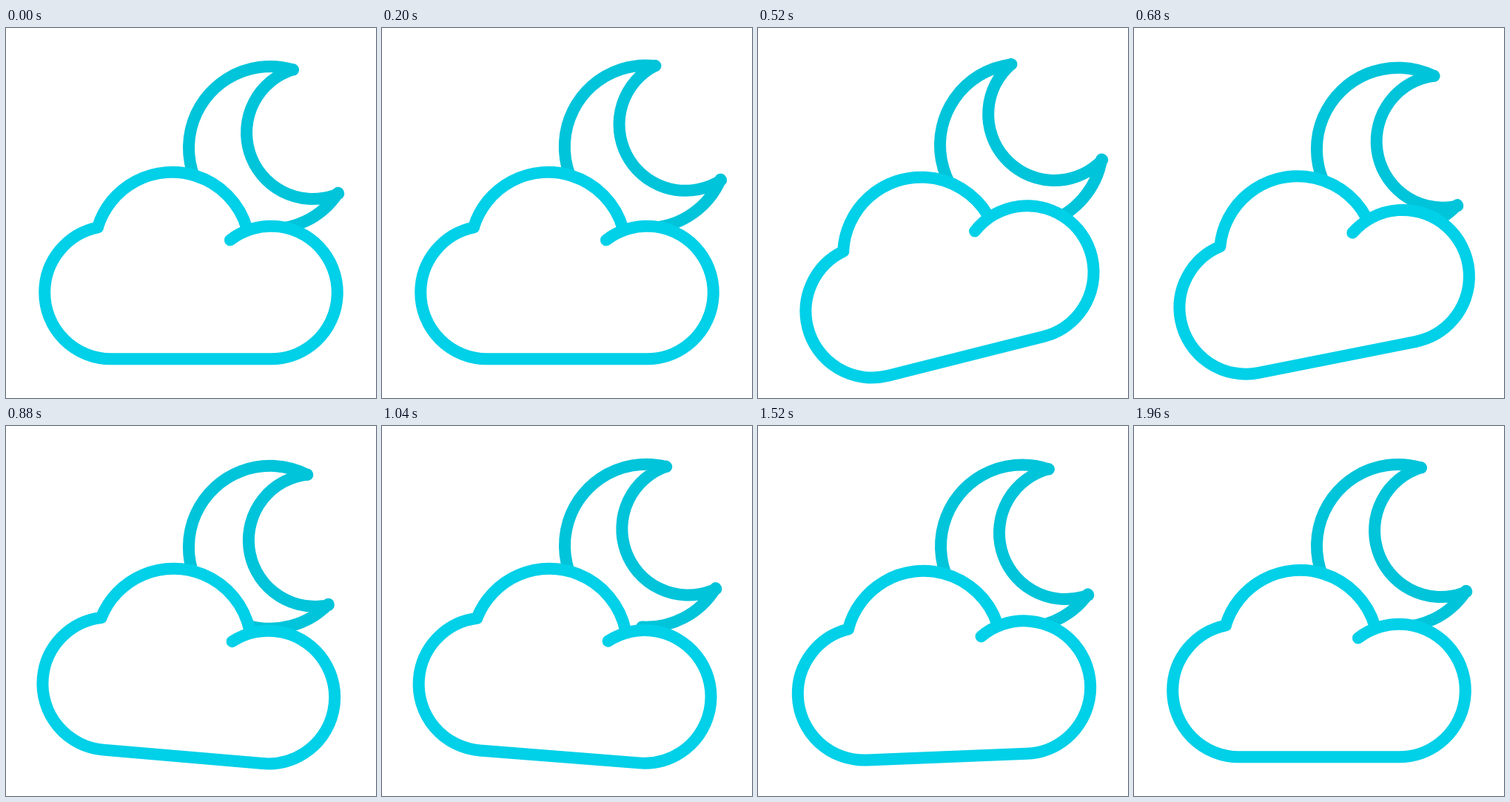
Recreate the animation shown at these times as an HTML page with a canvas. Size 500 px wide and 500 px high, loop 2 s.

```html
<!DOCTYPE html>
<html lang="en">
<head>
<meta charset="utf-8">
<title>Cloudy night</title>
<style>
html, body { margin: 0; width: 100%; height: 100%; overflow: hidden; background: #fff; }
canvas { display: block; width: 500px; height: 500px; }
</style>
</head>
<body>
<canvas id="stage" width="500" height="500"></canvas>
<script>
const ctx = document.getElementById('stage').getContext('2d');
const LOOP = 2000, STEP = 40;

// [time in ms, angle in degrees], eased between neighbours
const moonSwing = [[85, 0], [410, -35.1], [755, 15.5], [1175, -7.4], [1590, 3.4], [1960, 0]];
const cloudSwing = [[232, 0], [582, -15.3], [920, 5.6], [1425, -2.6], [1860, 0]];

const rad = degrees => degrees * Math.PI / 180;

function angleAt(keys, t) {
  if (t <= keys[0][0]) return keys[0][1];
  for (let i = 1; i < keys.length; i++) {
    const [t0, a] = keys[i - 1], [t1, b] = keys[i];
    if (t < t1) {
      const p = (t - t0) / (t1 - t0);
      return a + (b - a) * (1 - Math.cos(Math.PI * p)) / 2;
    }
  }
  return keys[keys.length - 1][1];
}

function swing(x, y, degrees, draw) {
  ctx.save();
  ctx.translate(x, y);
  ctx.rotate(rad(degrees));
  ctx.translate(-x, -y);
  ctx.beginPath();
  draw();
  ctx.restore();
}

// Open outline: both loose ends stay behind the cloud
function moon() {
  ctx.arc(357, 162, 110, rad(148), rad(286.4));
  ctx.arc(414.6, 141.4, 89.5, rad(252.5), rad(67.2), true);
  ctx.arc(357, 162, 110, rad(33.5), rad(95));
  ctx.strokeStyle = '#00c4da';
  ctx.stroke();
}

function cloud() {
  ctx.arc(358, 357.5, 89.8, -2.23, Math.PI / 2);
  ctx.arc(142, 357.5, 89.8, Math.PI / 2, 4.512);
  ctx.arc(224.5, 300, 105.2, -2.842, -0.28);
  ctx.fillStyle = '#fff';
  ctx.fill();
  ctx.strokeStyle = '#00d0e8';
  ctx.stroke();
}

function render(t) {
  ctx.fillStyle = '#fff';
  ctx.fillRect(0, 0, 500, 500);
  ctx.lineWidth = 16;
  ctx.lineCap = ctx.lineJoin = 'round';
  swing(347.5, 162.5, angleAt(moonSwing, t), moon);
  swing(250, 320.5, angleAt(cloudSwing, t), cloud);
}

const start = performance.now();
function tick() {
  const t = (performance.now() - start) % LOOP;
  render(Math.floor(t / STEP) * STEP);
  requestAnimationFrame(tick);
}
tick();
</script>
</body>
</html>
```
